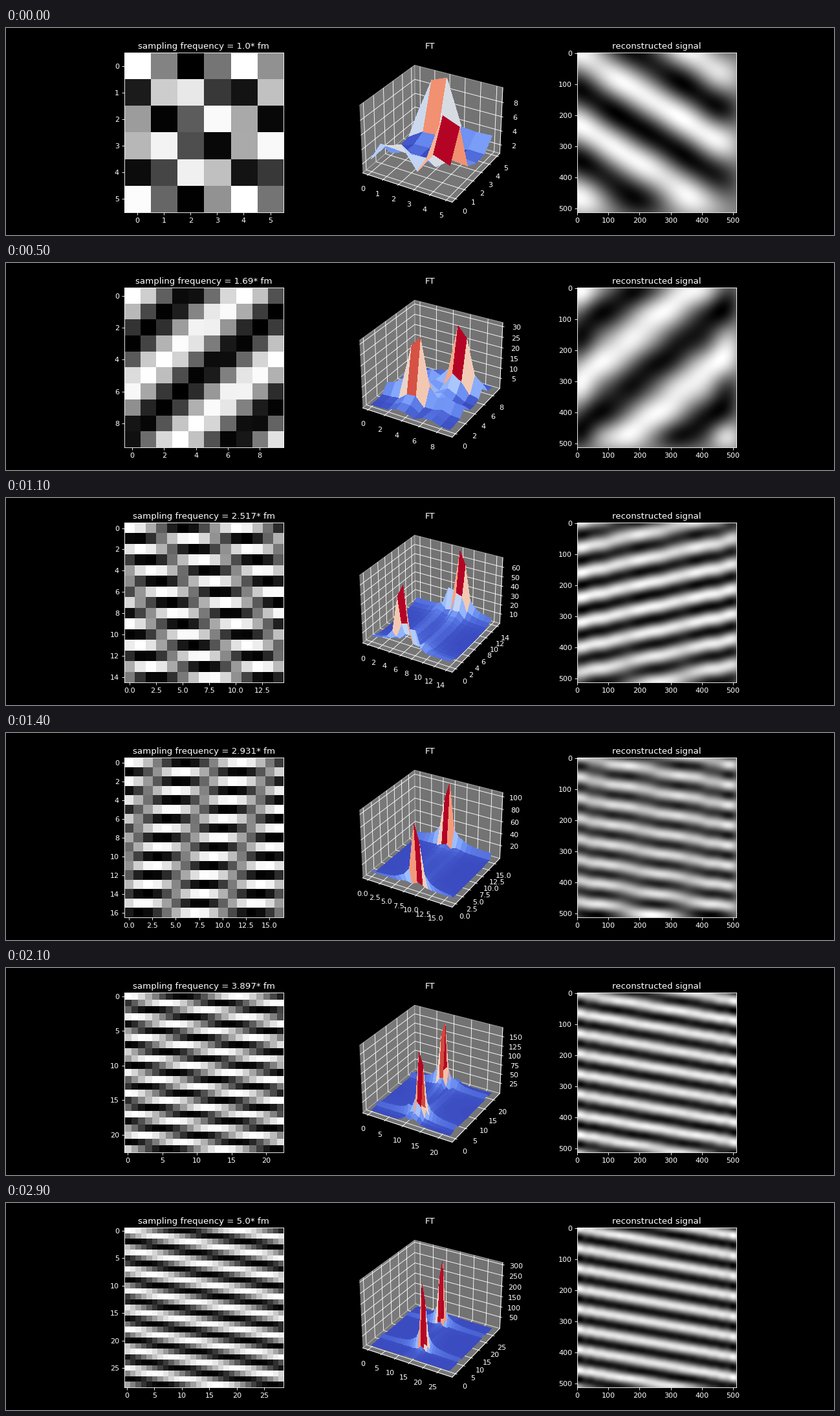
These frames come from a looping animation (1280 by 320 pixels, 3000 ms). A matplotlib script:

```python
import numpy as np
import matplotlib.pyplot as plt
from matplotlib.animation import FuncAnimation

SIZE = 512               # pixels per side of the rebuilt image
FREQ = 8                 # wave cycles across the unit square
ANGLE = np.radians(10)
FRAMES = 30
RATIOS = np.linspace(1, 5, FRAMES)

plt.style.use("dark_background")
fig = plt.figure(figsize=(16, 4), dpi=80)
ax_samples = fig.add_subplot(131)
ax_ft = fig.add_subplot(132, projection="3d")
ax_signal = fig.add_subplot(133)


def wave(x, y):
    return np.cos(2 * np.pi * FREQ * (x * np.sin(ANGLE) - y * np.cos(ANGLE)))


def sample(rate):
    t = np.arange(0, 1, 1 / rate)
    return wave(*np.meshgrid(t, t))


def reconstruct(samples, rate):
    """Separable Whittaker-Shannon interpolation."""
    t = np.arange(SIZE) / SIZE
    kernel = np.sinc(t[:, None] * rate - np.arange(len(samples)))
    return kernel @ samples @ kernel.T


def show_image(ax, data, title):
    ax.clear()
    ax.imshow(data, cmap="gray")
    ax.set_title(title)


def tick_inside(axis, data):
    """Keep ticks within the data, out of the padding around the box."""
    low, high = data.min(), data.max()
    ticks = axis.get_major_locator().tick_values(low, high)
    axis.set_ticks([t for t in ticks if low <= t <= high])


def show_spectrum(ax, samples):
    n = np.arange(len(samples))
    x, y = np.meshgrid(n, n)
    z = np.abs(np.fft.fftshift(np.fft.fft2(samples)))
    ax.clear()
    ax.plot_surface(x, y, z, cmap="coolwarm", linewidth=0, antialiased=False)
    for axis, data in zip((ax.xaxis, ax.yaxis, ax.zaxis), (x, y, z)):
        tick_inside(axis, data)
    ax.set_title("FT")


def update(i):
    ratio = RATIOS[i]
    rate = ratio * FREQ / np.sqrt(2)
    samples = sample(rate)
    show_image(ax_samples, samples,
               f"sampling frequency = {round(float(ratio), 3)}* fm")
    show_spectrum(ax_ft, samples)
    show_image(ax_signal, reconstruct(samples, rate), "reconstructed signal")


anim = FuncAnimation(fig, update, frames=FRAMES, init_func=lambda: update(0),
                     interval=100, repeat=True, repeat_delay=0)
plt.show()
```
